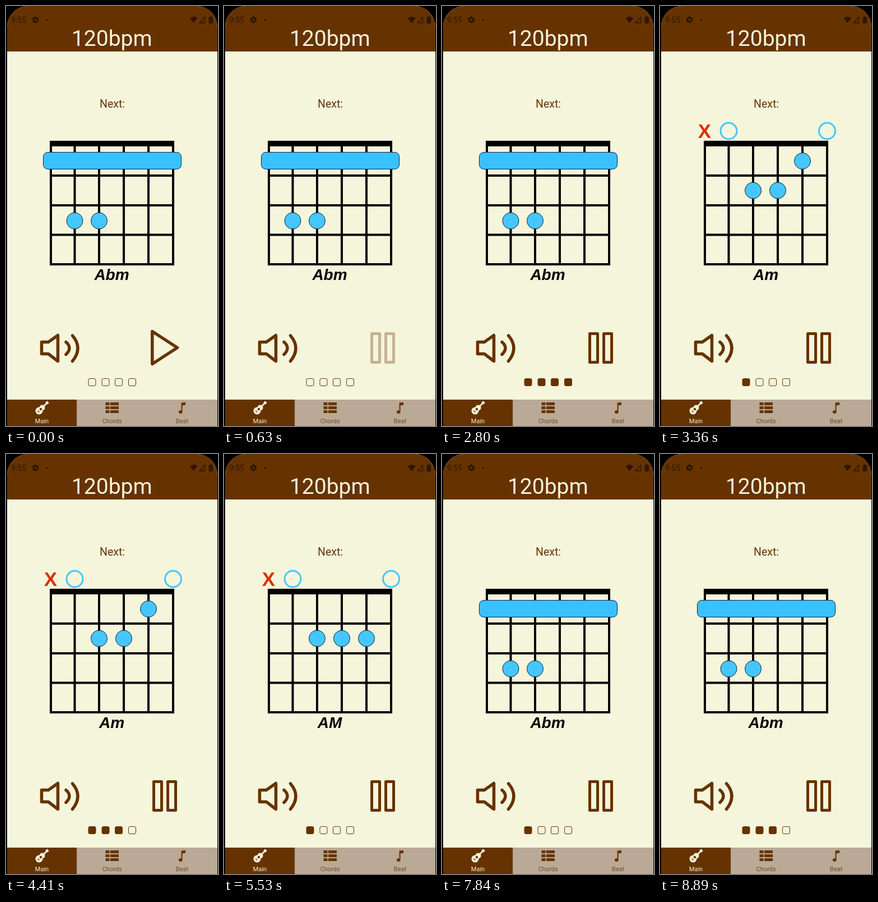
Recreate the animation shown at these times as an HTML page. Size 378x748 px, loop 9.45 s.

```html
<!DOCTYPE html>
<html lang="en">
<head>
<meta charset="utf-8">
<title>Chord metronome</title>
<style>
  html, body { margin: 0; width: 100%; height: 100%; overflow: hidden; background: #000; }
  svg { display: block; width: 378px; height: 748px; }
  text { font-family: Roboto, sans-serif; text-anchor: middle; }
  .chord { font: italic bold 28px "Liberation Sans", Arial, sans-serif; }
  .mute { font: bold 35px "Liberation Sans", Arial, sans-serif; fill: #dc3008; }
  .line { fill: none; stroke: #663300; stroke-width: 5.5; stroke-linejoin: round; stroke-linecap: round; }
  .tab { font-size: 11px; }
</style>
</head>
<body>
<svg viewBox="0 0 378 748">
  <path d="M2 748V38A37 38 0 0 1 39 0H340A37 38 0 0 1 377 38V748Z" fill="#f5f5dc"/>
  <path d="M2 81V38A37 38 0 0 1 39 0H340A37 38 0 0 1 377 38V81Z" fill="#663300"/>

  <g fill="#2e1700">
    <text x="22.5" y="30" font-size="14">9:55</text>
    <circle cx="52.5" cy="24.5" r="3.4" fill="none" stroke="#2e1700" stroke-width="2.8"/>
    <circle cx="52.5" cy="24.5" r="5.2" fill="none" stroke="#2e1700" stroke-width="2" stroke-dasharray="2.9 2.545"/>
    <circle cx="73.5" cy="24.5" r="1.7"/>
    <path d="M327.500 21.500Q334.500 16.500 341.500 21.500L334.500 30.500Z"/>
    <path d="M345 30L354.500 20V30Z" fill="none" stroke="#2e1700" stroke-width="1.3"/>
    <path d="M361.500 20H363.500V18.500H367V20H369V31H361.500Z"/>
  </g>
  <text x="188.800" y="71" font-size="39" fill="#f5f5dc">120bpm</text>
  <text x="189.500" y="180.500" font-size="19.500" fill="#663300">Next:</text>

  <path id="grid" fill="none" stroke="#000" stroke-width="4"/>
  <path d="M78 245H300" stroke="#000" stroke-width="10"/>
  <g id="fingers"></g>
  <text id="name" class="chord" x="188.500" y="488"></text>

  <g class="line">
    <path d="M63.500 598.500H75.500L92.500 586.500V632.500L75.500 619.500H63.500Z"/>
    <path d="M107 598.500Q119 609 107 620.500M118.500 587Q137.500 609 118.500 632.500"/>
    <path id="play" d="M260.800 579.500L305.500 608.500L260.800 637.500Z"/>
    <path id="pause" d="M263.500 583.500H277.500V634.500H263.500ZM288.500 583.500H302.500V634.500H288.500Z" stroke-width="5"/>
  </g>
  <g id="beats"></g>

  <path d="M2 701H126.500V748H2Z" fill="#663300"/>
  <path d="M126.500 701H377V748H126.500Z" fill="#baa996"/>
  <g fill="#f5f5dc">
    <circle cx="59" cy="721" r="6.500"/>
    <circle cx="64.500" cy="715.500" r="5"/>
    <path d="M63 717L74 706" stroke="#f5f5dc" stroke-width="2.600"/>
    <path d="M72 708L75 705" stroke="#f5f5dc" stroke-width="4.800"/>
    <circle cx="62" cy="718" r="2.200" fill="#663300"/>
    <path d="M56.500 720.500L59.500 723.500" stroke="#663300" stroke-width="1.400"/>
    <text class="tab" x="64" y="743">Main</text>
  </g>
  <g fill="#663300">
    <path id="list"/>
    <ellipse cx="311.200" cy="723" rx="3.300" ry="2.900"/>
    <path d="M312.500 723V706.500L320 705.800V710.500L314.500 711.500V723Z"/>
    <text class="tab" x="189.200" y="743" opacity=".8">Chords</text>
    <text class="tab" x="314" y="743" opacity=".8">Beat</text>
  </g>
</svg>
<script>
const LOOP = 9450, TICK = 70;
const $ = id => document.getElementById(id);
const strings = [80, 122.5, 166, 210, 254, 298];
const frets = [302, 355, 407.5, 460];

const dot = (string, y) =>
  `<circle cx="${strings[string]}" cy="${y}" r="14.5" fill="#46c6ff" stroke="#123" stroke-width="1"/>`;
const ring = string =>
  `<circle cx="${strings[string]}" cy="222.5" r="14.5" fill="none" stroke="#46c6ff" stroke-width="3"/>`;
const barre =
  '<rect x="66.5" y="260.5" width="246" height="30" rx="8" fill="#3bc0ff" stroke="#123" stroke-width="1"/>';
const openA = '<text class="mute" x="79.500" y="235">X</text>' + ring(1) + ring(5);

const chords = {
  Abm: barre + dot(1, 382.5) + dot(2, 382.5),
  Am: openA + dot(2, 328.5) + dot(3, 328.5) + dot(4, 276),
  AM: openA + dot(2, 328.5) + dot(3, 328.5) + dot(4, 328.5)
};

// Start times of the beats in each bar
const bars = [
  { chord: "Abm", beats: [1120, 1680, 2240, 2800] },
  { chord: "Am", beats: [3360, 3850, 4410, 4970] },
  { chord: "AM", beats: [5530, 6090, 6650, 7210] },
  { chord: "Abm", beats: [7840, 8330, 8890] }
];

$("grid").setAttribute("d",
  strings.map(x => `M${x} 240V462`).join("") + frets.map(y => `M78 ${y}H300`).join(""));
$("list").setAttribute("d",
  [706, 713, 720].map(y => `M177.500 ${y}h7v5h-7ZM186 ${y}h15v5h-15Z`).join(""));
$("beats").innerHTML = [153.5, 177.5, 201, 225].map(x =>
  `<rect x="${x - 6.5}" y="663.5" width="13" height="13" rx="2.500" stroke="#663300"/>`).join("");
const boxes = [...$("beats").children];

let shownChord;
function showChord(chord) {
  if (chord === shownChord) return;
  shownChord = chord;
  $("fingers").innerHTML = chords[chord];
  $("name").textContent = chord;
}

function render(ms) {
  const t = Math.floor(ms / TICK) * TICK;
  const bar = bars.filter(b => t >= b.beats[0]).pop() || bars[0];
  const count = bar.beats.filter(start => t >= start).length;
  showChord(bar.chord);
  boxes.forEach((box, i) => box.setAttribute("fill", i < count ? "#663300" : "none"));

  // The button dims when pressed, then returns as pause
  const playing = t >= 630;
  $("play").setAttribute("opacity", playing ? 0 : t < 490 ? 1 : t < 560 ? 0.7 : 0.3);
  $("pause").setAttribute("opacity", playing ? Math.min(1, 0.34 + 0.66 * (t - 630) / 210) : 0);
}

const origin = performance.now();
function frame() {
  render((performance.now() - origin) % LOOP);
  requestAnimationFrame(frame);
}
frame();
</script>
</body>
</html>
```
